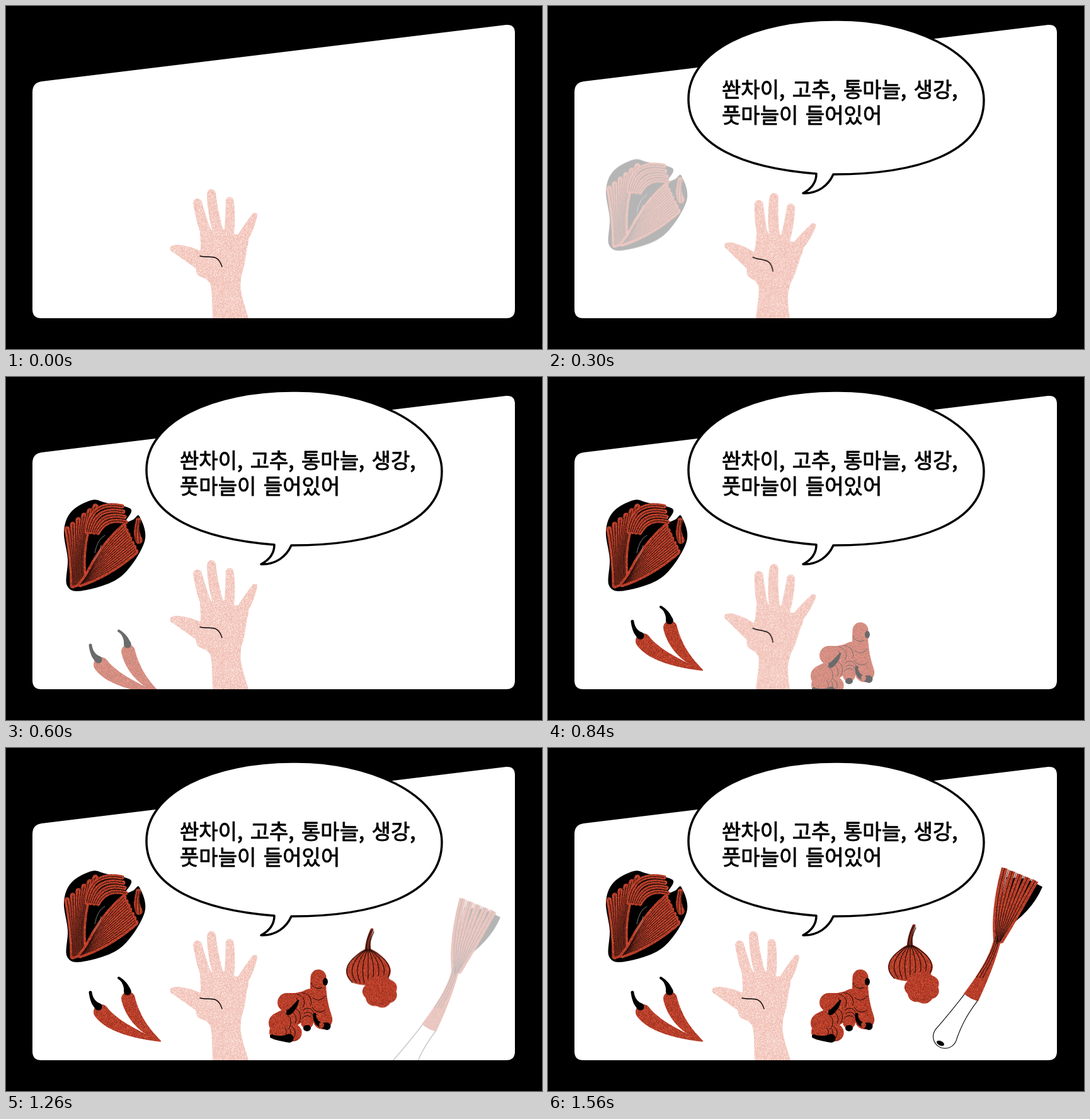
Animation of 851x546 px, one loop 1.92 s. Source, as an HTML page with a canvas:

```html
<!DOCTYPE html>
<html lang="ko">
<head>
<meta charset="utf-8">
<style>
html, body { margin: 0; width: 100%; height: 100%; overflow: hidden; background: #000; }
canvas { display: block; }
</style>
</head>
<body>
<canvas id="stage" width="851" height="546"></canvas>
<script>
const W = 851, H = 546, LOOP = 1920, STEP = 60, LAST = 26, TAU = Math.PI * 2;
const stage = document.getElementById('stage').getContext('2d');
const mix = (a, b, t) => a + (b - a) * t;

let seed = 7;
const random = () => (seed = (seed * 16807) % 2147483647) / 2147483647;

function newCanvas(w, h) {
  const canvas = document.createElement('canvas');
  canvas.width = w;
  canvas.height = h;
  return canvas.getContext('2d');
}

// Speckled print texture from a base, a light and a dark colour
function grain(base, light, dark) {
  const size = 256, g = newCanvas(size, size);
  for (let y = 0; y < size; y++) for (let x = 0; x < size; x++) {
    const r = random();
    g.fillStyle = r < .2 ? light : r < .48 ? dark : base;
    g.fillRect(x, y, 1, 1);
  }
  return stage.createPattern(g.canvas, 'repeat');
}
const RED = grain('#bf3f29', '#cd523a', '#96301f');
const SKIN = grain('#f5cdc4', '#fbe5df', '#eebbb0');
const INK = '#1c0b08';

// Closed smooth outline through a few "x,y" points
function outline(text) {
  const pts = text.split(' ').map(p => p.split(',').map(Number));
  const n = pts.length, path = new Path2D();
  const at = i => pts[(i + n) % n];
  path.moveTo(...pts[0]);
  for (let i = 0; i < n; i++) {
    const [a, b, c, d] = [at(i - 1), at(i), at(i + 1), at(i + 2)];
    path.bezierCurveTo(b[0] + (c[0] - a[0]) / 6, b[1] + (c[1] - a[1]) / 6,
      c[0] - (d[0] - b[0]) / 6, c[1] - (d[1] - b[1]) / 6, ...c);
  }
  return path;
}

// A limb bends from start over a control point to its end: [x0,y0, cx,cy, x1,y1, r0,r1]
function along([x0, y0, cx, cy, x1, y1, r0, r1], t) {
  return {
    x: mix(mix(x0, cx, t), mix(cx, x1, t), t),
    y: mix(mix(y0, cy, t), mix(cy, y1, t), t),
    r: mix(r0, r1, t * t)
  };
}

function layer(draw) {
  const g = newCanvas(W, H);
  g.lineCap = g.lineJoin = 'round';
  const limb = (style, shape, grow = 0) => {
    g.fillStyle = style;
    g.beginPath();
    for (let t = 0; t <= 1; t += .01) {
      const { x, y, r } = along(shape, t);
      g.moveTo(x, y);
      g.arc(x, y, r + grow, 0, TAU);
    }
    g.fill();
  };
  const fill = (style, path) => {
    g.fillStyle = style;
    g.fill(path);
  };
  const oval = (style, x, y, rx, ry, turn = 0) => {
    g.fillStyle = style;
    g.beginPath();
    g.ellipse(x, y, rx, ry, turn, 0, TAU);
    g.fill();
  };
  // n curves spread evenly between the curves a and b
  const fan = (style, width, n, a, b) => {
    g.strokeStyle = style;
    g.lineWidth = width;
    for (let i = 0; i < n; i++) {
      const [x0, y0, cx, cy, x1, y1] = a.map((v, k) => mix(v, b[k], i / Math.max(1, n - 1)));
      g.beginPath();
      g.moveTo(x0, y0);
      g.quadraticCurveTo(cx, cy, x1, y1);
      g.stroke();
    }
  };
  const leaves = (width, n, a, b) => {
    fan(RED, width, n, a, b);
    fan(INK, 1, n * 2 - 1, a, b);
  };
  draw({ g, limb, fill, oval, fan, leaves });
  return g.canvas;
}

const hand = layer(({ g, limb, fill }) => {
  fill(SKIN, outline('309,356 325,357 345,355 363,363 384,367 382,390 378,414 373,434 374,458 385,497 400,546 330,546 328,497 326,450 319,436 303,426 303,400 309,386'));
  [
    [316, 411, 290, 392, 265, 386, 14, 5],
    [317, 358, 309, 338, 304, 313, 8.5, 7],
    [336, 357, 328, 328, 326, 298, 8.5, 7],
    [354, 362, 357, 335, 355, 310, 8, 6.5],
    [374, 372, 386, 352, 395, 333, 9, 4]
  ].forEach(finger => limb(SKIN, finger));
  g.lineWidth = 1.4;
  g.stroke(new Path2D('M308 398C324 402 336 393 343 415'));
});

const mustard = layer(({ limb, fill, fan, leaves }) => {
  fill('#000', outline('92,245 104,214 136,196 158,200 198,210 190,230 202,227 212,222 220,262 182,318 122,340 97,332 98,290'));
  leaves(9, 6, [106, 332, 106, 290, 97, 242], [124, 326, 116, 262, 142, 206]);
  leaves(9, 7, [118, 330, 165, 314, 206, 278], [128, 318, 152, 268, 187, 238]);
  leaves(7, 4, [128, 246, 134, 196, 184, 206], [146, 248, 160, 222, 190, 231]);
  limb(RED, [210, 228, 205, 245, 211, 260, 4, 6]);
  fan(INK, 1, 3, [206, 228, 202, 245, 200, 262], [212, 228, 210, 245, 212, 264]);
  fan('#999', .8, 2, [157, 252, 145, 258, 141, 280], [151, 268, 149, 280, 140, 292]);
});

const chili = layer(({ limb, fan }) => {
  limb(RED, [194, 399, 204, 440, 246, 467, 11, .8]);
  limb(RED, [151, 420, 171, 447, 246, 467, 12, .8]);
  limb('#000', [134, 389, 136, 405, 147, 412, 2.5, 6]);
  limb('#000', [179, 366, 190, 373, 193, 388, 2, 6]);
  fan('#fff', 3.6, 1, [166, 425, 170, 433, 177, 437], []);
  fan('#fff', 3.6, 1, [161, 418, 161, 418, 162, 419], []);
  fan('#fff', 3.6, 1, [205, 407, 209, 415, 211, 425], []);
  fan(INK, 1, 1, [183, 416, 198, 445, 219, 459], []);
});

const ginger = layer(({ g, limb, oval }) => {
  const limbs = [
    [478, 437, 480, 428, 478, 415, 10, 12],
    [446, 405, 465, 407, 484, 400, 15, 17],
    [434, 438, 450, 430, 462, 422, 17, 16],
    [431, 452, 444, 454, 456, 453, 13, 14],
    [496, 365, 494, 398, 503, 433, 12.5, 15.5]
  ];
  limbs.forEach(shape => limb(RED, shape));
  g.strokeStyle = INK;
  for (const shape of limbs) for (let t = .1; t < .9; t += .27) {
    const { x, y, r } = along(shape, t), next = along(shape, t + .1);
    const turn = Math.atan2(next.y - y, next.x - x) + random() - .5;
    g.beginPath();
    g.arc(x, y, r * .9, turn - 1, turn + 1);
    g.stroke();
  }
  limb('#000', [449, 421, 458, 414, 464, 402, 4, 1.5]);
  limb('#000', [490, 424, 489, 441, 510, 443, 2.5, 6]);
  limb('#000', [422, 459, 436, 464, 450, 462, 3, 7]);
  oval('#000', 507, 372, 4, 6);
  oval('#000', 478, 446, 6, 5);
  oval(RED, 501, 441, 4, 5);
});

const garlic = layer(({ g, limb, fill, fan }) => {
  limb('#7c2a1c', [581, 283, 573, 300, 575, 320, 2.5, 6]);
  fill(RED, outline('575,313 551,328 540,348 549,366 575,371 601,366 611,348 600,328'));
  fan(INK, 1.1, 9, [572, 314, 524, 340, 550, 367], [578, 314, 626, 340, 600, 367]);
  fan(INK, 1.2, 2, [580, 284, 570, 302, 573, 318], [584, 286, 576, 302, 577, 318]);
  g.translate(594, 381);
  const clove = new Path2D();
  for (let a = 0; a < TAU; a += .05) {
    const r = 25.5 + 2.6 * Math.abs(Math.sin(a * 3.5));
    clove.lineTo(r * Math.cos(a), r * .93 * Math.sin(a));
  }
  fill(RED, clove);
  for (let a = 0; a < TAU; a += TAU / 13) {
    const bend = a + .3;
    fan(INK, 1, 1, [-1, -5, 14 * Math.cos(bend), 13 * Math.sin(bend) - 3, 25 * Math.cos(a), 23 * Math.sin(a)], []);
  }
});

const leek = layer(({ g, limb, fill, oval, leaves }) => {
  const bulb = [671, 398, 648, 428, 630, 460, 11.5, 19];
  limb('#111', bulb, .6);
  limb('#fff', bulb, -.6);
  oval('#000', 623, 470, 6.5, 3.5, .45);
  fill('#000', new Path2D('M728 206L760 208L785 221Q768 262 720 292Z'));
  fill(RED, new Path2D('M709 285Q713 322 660 391Q671 400 683 403Q715 335 724 285Z'));
  g.lineCap = 'butt';
  leaves(10, 5, [713, 312, 706, 262, 725, 191], [718, 308, 744, 265, 774, 211]);
  leaves(2, 2, [711, 300, 708, 325, 680, 365], [717, 300, 712, 328, 690, 366]);
});

const bubblePath = new Path2D('M426 267C312 258 223 223 223 148C223 70 330 22 455 22C575 20 692 74 692 150C692 236 582 268 453 268C445 286 428 299 405 298C420 290 426 280 426 267Z');
const bubble = layer(({ g }) => {
  g.lineWidth = 3.5;
  g.stroke(bubblePath);
  g.font = '500 33px "Noto Sans CJK KR", "Noto Sans KR", "Noto Sans CJK", sans-serif';
  g.wordSpacing = '4px';
  g.lineWidth = .9;
  ['쏸차이, 고추, 통마늘, 생강,', '풋마늘이 들어있어'].forEach((line, i) => {
    g.fillText(line, 276, 145 + 41 * i);
    g.strokeText(line, 276, 145 + 41 * i);
  });
});

const panel = new Path2D('M42 137Q42 122 57 120L794 30Q808 29 808 43V483Q808 497 794 497H56Q42 497 42 483Z');
const items = [mustard, chili, ginger, garlic, leek];
const fade = step => Math.max(0, Math.min(1, step * .29));

// Wave right, hold, wave back: two rounds of ten steps
function wave(step) {
  const k = step % 10;
  return step < 20 ? Math.min(1, k * .27, (10 - k) / 3) : 0;
}

function drawBubble(step) {
  if (step < 1) return;
  const alpha = fade(step);
  stage.fillStyle = '#fff';
  stage.fill(bubblePath);
  stage.save();
  stage.clip(bubblePath);
  stage.globalAlpha = 1 - alpha;
  stage.lineWidth = 4;
  stage.stroke(new Path2D('M200 101L700 40'));
  stage.restore();
  stage.globalAlpha = alpha;
  stage.drawImage(bubble, 0, 0);
  stage.globalAlpha = 1;
}

function render(now) {
  const step = Math.min(LAST, Math.floor(now % LOOP / STEP));
  stage.fillStyle = '#000';
  stage.fillRect(0, 0, W, H);
  stage.fillStyle = '#fff';
  stage.fill(panel);
  drawBubble(step);

  stage.save();
  stage.clip(panel);
  items.forEach((picture, i) => {
    const age = step - 4 * (i + 1);
    if (age <= 0) return;
    stage.globalAlpha = fade(age);
    stage.drawImage(picture, 0, Math.max(0, 59 - 10.5 * age));
  });
  stage.globalAlpha = 1;
  stage.translate(304, 508);
  stage.rotate(wave(step) * .158);
  stage.drawImage(hand, -304, -508);
  stage.restore();
  requestAnimationFrame(render);
}
requestAnimationFrame(render);
</script>
</body>
</html>
```
